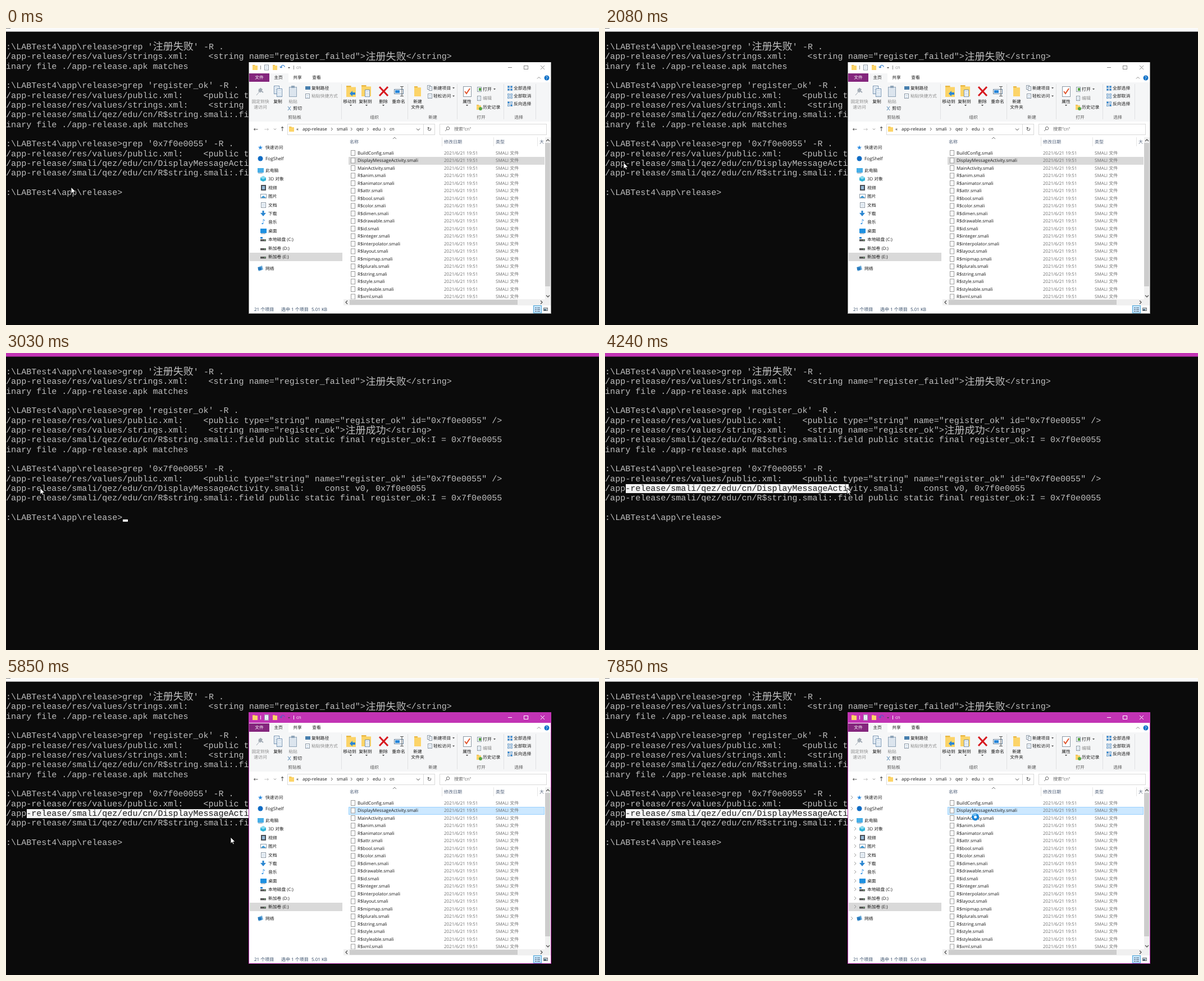
An HTML page with a canvas that plays this animation: 1056 px wide and 530 px high, repeating every 8 s.

```html
<!DOCTYPE html>
<html lang="zh">
<head>
<meta charset="utf-8">
<title>Console and file window</title>
<style>
html, body { margin: 0; width: 100%; height: 100%; overflow: hidden; background: #0b0b0b; }
canvas { display: block; }
</style>
</head>
<body>
<canvas id="stage" width="1056" height="530"></canvas>
<script>
const ctx = document.getElementById('stage').getContext('2d');
ctx.textRendering = 'geometricPrecision';

const LOOP = 8000, HIDE = 2200, BLUR = 5160, SHOW = 5850, SELECT = 3260, BUSY = 7270;
const UI = "'Open Sans', 'Noto Sans CJK SC', 'Noto Sans CJK', sans-serif";
const SYMBOL = "'DejaVu Sans', sans-serif";
const MAGENTA = '#c233b4', BLUE = '#2b86d1', FOLDER = '#fcd468', GRAY = '#8c8c8c';

// ---- drawing helpers ----
function box(x, y, w, h, fill, edge) {
  if (fill) { ctx.fillStyle = fill; ctx.fillRect(x, y, w, h); }
  if (edge) { ctx.strokeStyle = edge; ctx.lineWidth = 1; ctx.strokeRect(x + .5, y + .5, w - 1, h - 1); }
}
function line(color, width, ...p) {
  ctx.beginPath();
  for (let i = 0; i < p.length; i += 2) ctx.lineTo(p[i], p[i + 1]);
  ctx.strokeStyle = color;
  ctx.lineWidth = width;
  ctx.stroke();
}
function shape(fill, ...p) {
  ctx.beginPath();
  for (let i = 0; i < p.length; i += 2) ctx.lineTo(p[i], p[i + 1]);
  ctx.closePath();
  ctx.fillStyle = fill;
  ctx.fill();
}
function disc(x, y, r, fill) {
  ctx.beginPath();
  ctx.arc(x, y, r, 0, 7);
  ctx.fillStyle = fill;
  ctx.fill();
}
// y is the middle of the line
function text(s, x, y, color = '#1a1a1a', size = 8, align = 'left', family = UI) {
  ctx.font = `${size}px ${family}`;
  ctx.textAlign = align;
  ctx.fillStyle = color;
  ctx.fillText(s, x, y + size * .36);
}
const symbol = (s, x, y, color, size) => text(s, x, y, color, size, 'center', SYMBOL);
const label = (s, x, y, color) => text(s, x, y, color, 7.8, 'center');
const caret = (x, y) => shape('#444', x - 2, y - 1, x + 2, y - 1, x, y + 1.2);
function page(x, y, w, h, edge = '#8a98a6') {
  box(x, y, w, h, '#fff', edge);
  for (let i = 3; i < h - 2; i += 3) box(x + 2, y + i, w - 4, 1, '#a9c4de');
}
function folder(x, y, w, h) {
  box(x, y, w * .5, h, '#e9b63f');
  box(x, y + h * .12, w, h * .88, FOLDER);
}

// ---- console ----
const CELL = 9.02, LEFT = -8.9, ROW = 17.36, TOP = 24.6, PICKED = 12, START = 5;
const prompt = 'E:\\LABTest4\\app\\release>', base = './app-release/';
const pub = base + 'res/values/public.xml:    <public type="string" name="register_ok" id="0x7f0e0055" />';
const field = base + 'smali/qez/edu/cn/R$string.smali:.field public static final register_ok:I = 0x7f0e0055';
const match = 'Binary file ./app-release.apk matches';
const rows = [
  prompt + "grep '注册失败' -R .",
  base + 'res/values/strings.xml:    <string name="register_failed">注册失败</string>',
  match, '',
  prompt + "grep 'register_ok' -R .",
  pub,
  base + 'res/values/strings.xml:    <string name="register_ok">注册成功</string>',
  field, match, '',
  prompt + "grep '0x7f0e0055' -R .",
  pub,
  base + 'smali/qez/edu/cn/DisplayMessageActivity.smali:    const v0, 0x7f0e0055',
  field, '',
  prompt
];
const colX = col => LEFT + col * CELL;

function printRow(i, color) {
  let x = LEFT;
  ctx.fillStyle = color;
  ctx.textAlign = 'left';
  for (const run of rows[i].match(/[\u4e00-\u9fff]+|[^\u4e00-\u9fff]+/g) || []) {
    const wide = run > '\u4e00';
    ctx.font = wide ? "300 18.04px 'Noto Sans CJK SC', 'Noto Sans CJK', sans-serif"
                    : "15.03px 'Liberation Mono', monospace";
    ctx.fillText(run, x, TOP + i * ROW + (wide ? 14.8 : 13.2));
    x += run.length * CELL * (wide ? 2 : 1);
  }
}

function drawConsole(t, mouse) {
  const focused = t >= HIDE && t < BLUR;
  box(0, 0, 1056, 530, '#0b0b0b');
  box(0, 0, 1056, 6.5, focused ? MAGENTA : '#fbfbfb');
  if (!focused) box(0, 0, 8, 1, '#777');
  rows.forEach((_, i) => printRow(i, '#bebebe'));
  if (t >= SELECT) {
    const end = t < 4600 ? Math.floor((mouse.x - LEFT) / CELL) + 1 : 53;
    const x = Math.round(colX(START)) + 1, y = Math.round(TOP + PICKED * ROW) + 1;
    ctx.save();
    ctx.beginPath();
    ctx.rect(x, y, Math.round((end - START) * CELL), 16);
    ctx.clip();
    box(x, y, 500, 20, '#f2f2f2');
    printRow(PICKED, '#1c1c1c');
    ctx.restore();
  }
  if (focused && (t - 2510 + 1060) % 1060 < 530) box(208, 297, 9, 4, '#fff');
}

// ---- file window ----
const files = ['BuildConfig', 'DisplayMessageActivity', 'MainActivity',
  ...'anim animator attr bool color dimen drawable id integer interpolator layout mipmap plurals string style styleable xml'
    .split(' ').map(s => 'R$' + s)];

const screen = (x, y, c) => { box(x - 5, y - 4, 11, 8, c); box(x - 4, y + 4.5, 8, 1, '#6d8aa5'); };
const disk = (x, y) => { box(x - 5, y, 10, 3.5, '#555'); box(x + 2, y + 1, 2, 1, '#7fe08a'); };
const nav = [
  ['快速访问', 213, (x, y) => symbol('★', x, y, '#2c8be0', 11)],
  ['FogShelf', 233, (x, y) => disc(x, y, 4.5, '#0f6cc4')],
  ['此电脑', 254, (x, y) => screen(x, y, '#45aee8')],
  ['3D 对象', 269, (x, y) => { shape('#2fb4d8', x - 5, y - 2, x, y - 5, x + 5, y - 2, x + 5, y + 3, x, y + 5, x - 5, y + 3); shape('#8adcf0', x - 5, y - 2, x, y - 5, x + 5, y - 2, x, y + 1); }],
  ['视频', 285, (x, y) => { box(x - 4, y - 5, 9, 10, '#4a4f57'); box(x - 2, y - 3, 5, 6, '#93b7d4'); }],
  ['图片', 300, (x, y) => { box(x - 5, y - 4, 11, 8, '#fff', '#8b9aa8'); shape('#3d9bd8', x - 4, y + 3, x, y - 1, x + 5, y + 3); }],
  ['文档', 316, (x, y) => page(x - 4, y - 5, 9, 10)],
  ['下载', 331, (x, y) => { box(x - 1.5, y - 5, 3, 5, BLUE); shape(BLUE, x - 5, y - 1, x + 5, y - 1, x, y + 5); }],
  ['音乐', 346, (x, y) => symbol('♪', x, y, '#1e88e5', 12)],
  ['桌面', 362, (x, y) => screen(x, y, '#1e90e0')],
  ['本地磁盘 (C:)', 377, (x, y) => { disk(x, y); box(x - 5, y - 4, 4, 3, BLUE); }],
  ['新加卷 (D:)', 393, disk],
  ['新加卷 (E:)', 408, disk],
  ['网络', 429, (x, y) => { shape('#6aa9d8', x - 5, y - 2, x + 3, y - 5, x + 5, y + 2, x - 3, y + 5); box(x - 4, y - 2, 6, 5, '#2779bd'); }]
];

function drawTitle(active) {
  const ink = active ? '#fff' : '#8a8a8a';
  box(433, 61, 537, 19, active ? MAGENTA : '#fff');
  folder(439, 66, 9, 9);
  box(453, 67, 1, 7, ink);
  page(460, 65.5, 8, 10);
  folder(475, 66, 8, 9);
  symbol('↶', 492, 70, active ? '#4a63c0' : '#1f6fc4', 12);
  caret(504, 71);
  box(512, 67, 1, 7, ink);
  text('cn', 517, 70.5, ink);
  line(ink, 1, 894, 70.5, 901, 70.5);
  box(922, 67, 8, 7, null, ink);
  line(ink, 1, 952, 67, 959, 74);
  line(ink, 1, 959, 67, 952, 74);
}

function drawRibbon() {
  box(433, 80, 537, 17, '#fff');
  box(433, 97, 537, 70, '#f5f6f7');
  box(433, 81, 36, 15, '#84267d');
  box(470, 81, 33, 17, '#f5f6f7');
  label('文件', 451, 88.5, '#fff');
  label('主页', 485, 88.5);
  label('共享', 519, 88.5);
  label('查看', 553, 88.5);
  line('#888', 1, 946, 90.5, 949, 87.5, 952, 90.5);
  disc(963, 89, 4.5, '#1473c8');
  label('?', 963, 89, '#fff');
  for (const x of [597, 715, 803, 886, 943]) box(x, 100, 1, 63, '#e0e1e3');
  [['剪贴板', 514], ['组织', 656], ['新建', 760], ['打开', 846], ['选择', 913]]
    .forEach(([s, x]) => label(s, x, 159.5, '#555'));

  line('#a2abb5', 5, 455, 108, 451, 114);
  line('#a2abb5', 2, 450, 109, 458, 115);
  line('#a2abb5', 1, 451, 114, 446, 120);
  label('固定到快', 453, 131, GRAY);
  label('速访问', 453, 141, GRAY);
  page(477, 103, 10, 15, '#6f8fb0');
  page(482, 108, 10, 15, '#6f8fb0');
  label('复制', 484, 131);
  box(504, 105, 14, 18, '#dce5ee', '#8fa4b8');
  box(508, 103, 6, 4, '#8fa4b8');
  label('粘贴', 511, 131, GRAY);
  line('#477fae', 1, 502, 140, 507, 147);
  line('#477fae', 1, 507, 140, 502, 147);
  text('剪切', 511, 143.5);
  box(533, 104, 9, 6, '#477fae');
  text('复制路径', 544, 107, '#1a1a1a', 7.8);
  page(533, 117, 8, 9);
  text('粘贴快捷方式', 544, 121.5, GRAY, 7.8);

  folder(606, 103, 17, 20);
  shape('#2886d8', 612, 117, 617, 112, 617, 115, 622, 115, 622, 119, 617, 119, 617, 122);
  label('移动到', 612, 131);
  caret(614, 138);
  folder(633, 102, 17, 20);
  page(639, 110, 9, 13, '#6f8fb0');
  label('复制到', 640, 131);
  caret(642, 138);
  line('#d7191f', 3, 665, 105, 680, 121);
  line('#d7191f', 3, 680, 105, 665, 121);
  label('删除', 672, 131);
  caret(672, 138);
  box(691, 109, 17, 9, '#fff', '#64829e');
  box(693, 111, 8, 5, '#2886d8');
  line('#555', 1, 702, 104.5, 708, 104.5, 705, 104.5, 705, 121.5, 702, 121.5, 708, 121.5);
  label('重命名', 699, 131);

  folder(727, 104, 12, 18);
  label('新建', 733, 131);
  label('文件夹', 733, 141);
  page(750, 102, 6, 8);
  page(753, 104, 6, 8);
  text('新建项目', 761, 107, '#1a1a1a', 7.8);
  caret(797, 107);
  page(751, 117, 8, 9);
  text('轻松访问', 761, 121.5, '#1a1a1a', 7.8);
  caret(797, 121.5);

  box(814, 104, 15, 19, '#fff', '#8b98a4');
  line('#e0542c', 2, 817, 113, 820, 117, 826, 108);
  label('属性', 821, 131);
  caret(821, 138);
  page(839, 105, 8, 9);
  box(842, 107, 4, 5, '#59a548');
  text('打开', 849, 109);
  caret(870, 109);
  page(839, 121, 7, 9);
  text('编辑', 849, 125.5, GRAY);
  folder(838, 137, 8, 9);
  disc(845, 144, 3, '#59a548');
  text('历史记录', 849, 141.5, '#1a1a1a', 7.8);

  ['全部选择', '全部取消', '反向选择'].forEach((s, i) => {
    const y = 103 + 14 * i;
    for (let k = 0; k < 4; k++) {
      const on = i === 0 || i === 2 && k % 3 === 0;
      box(893 + k % 2 * 5, y + (k >> 1) * 5, 4, 4, on ? '#2886d8' : '#d5e4f2', '#7da7cd');
    }
    text(s, 904, y + 4.5, '#1a1a1a', 7.8);
  });
}

function drawAddress() {
  symbol('←', 445, 180.5, '#444', 10);
  symbol('→', 464, 180.5, '#bbb', 10);
  line('#888', 1, 477, 179.5, 479, 181.5, 481, 179.5);
  symbol('↑', 492, 180.5, '#444', 11);
  box(501, 171, 263, 20, '#fff', '#d9d9d9');
  box(743, 171, 1, 20, '#d9d9d9');
  folder(504, 176, 9, 9);
  text('«', 517, 180);
  [['app-release', 528], ['smali', 589], ['qez', 624], ['edu', 653], ['cn', 683]].forEach(([s, x], i) => {
    text(s, x, 180.5);
    if (i) line('#555', 1, x - 10, 178, x - 7.5, 180.5, x - 10, 183);
  });
  line('#444', 1, 731, 179.5, 734, 182.5, 737, 179.5);
  symbol('↻', 754, 180.5, '#444', 10);
  box(772, 171, 191, 20, '#fff', '#d9d9d9');
  ctx.beginPath();
  ctx.arc(787, 179, 2.7, 0, 7);
  ctx.strokeStyle = '#777';
  ctx.stroke();
  line('#777', 1, 785, 181, 782, 184);
  text('搜索"cn"', 798, 180.5, '#666');
}

function drawNav(active, mouse) {
  const inside = active && mouse.x > 432;
  nav.forEach(([name, y, icon], i) => {
    const child = i > 2 && i < 13, x = child ? 467 : 462;
    if (i === 12) box(434, 401, 165, 15, '#d9d9d9');
    else if (inside && mouse.x < 599 && Math.abs(y - mouse.y) < 7.7) box(434, y - 7, 165, 15, '#e5f3ff');
    icon(x - 9, y);
    text(name, x, y, '#1a1a1a', i === 1 ? 8.2 : 7.8);
    if (!inside) return;
    const cx = child ? 445 : 439;
    if (i === 2) line('#444', 1, cx - 3, y - 1.5, cx, y + 1.5, cx + 3, y - 1.5);
    else line('#9a9a9a', 1, cx - 1, y - 3, cx + 2, y, cx - 1, y + 3);
  });
}

function drawFiles(active) {
  for (const x of [776, 868, 946]) box(x, 195, 1, 16, '#e5e5e5');
  line('#777', 1, 689, 198, 692, 195, 695, 198);
  [['名称', 612], ['修改日期', 780], ['类型', 872], ['大', 950]].forEach(([s, x]) => text(s, x, 203.5, '#50607a'));
  files.forEach((name, i) => {
    const y = 223 + i * 13.5;
    if (i === 1) box(610, 230, 349, 14, active ? '#cce8ff' : '#d9d9d9', active ? '#99d1ff' : null);
    box(614, y - 5, 8, 10, '#fff', '#9a9a9a');
    text(name + '.smali', 626, y);
    text('2021/6/21 19:51', 780, y, '#6d6d6d');
    text('SMALI 文件', 872, y, '#6d6d6d');
  });
  box(960, 195, 10, 290, '#f0f0f0');
  box(960, 205, 9, 256, '#cdcdcd');
  line('#555', 1.3, 962, 202, 965, 199, 968, 202);
  line('#555', 1.3, 962, 477, 965, 480, 968, 477);
  box(601, 484, 369, 11, '#f0f0f0');
  box(612, 485, 299, 9, '#cdcdcd');
  line('#555', 1.3, 608, 486.5, 605, 489.5, 608, 492.5);
  line('#555', 1.3, 952, 486.5, 955, 489.5, 952, 492.5);
}

function drawStatus() {
  box(433, 495, 537, 14, '#fff');
  text('21 个项目', 442, 502.5, '#28415f');
  text('选中 1 个项目', 490, 502.5, '#28415f');
  text('5.01 KB', 544, 502.5, '#28415f');
  box(939, 495, 15, 14, '#cce8ff', '#4aa5d8');
  for (let i = 0; i < 3; i++) {
    box(942, 499 + i * 3, 3, 1, '#3d5a70');
    box(946, 499 + i * 3, 5, 1, '#3d5a70');
  }
  box(957, 499, 8, 6, '#b9cbd6', '#777');
  box(958, 502, 4, 2, '#3d5a70');
}

function drawWindow(active, mouse) {
  box(432, 61, 539, 449, active ? MAGENTA : '#8a8a8a');
  box(433, 61, 537, 448, '#fff');
  drawTitle(active);
  drawRibbon();
  drawAddress();
  drawNav(active, mouse);
  drawFiles(active);
  drawStatus();
}

// ---- pointer ----
const path = [
  [0, 116, 284], [210, 116, 284], [840, 52, 253], [1000, 62, 273], [1080, 55, 258], [1540, 55, 258],
  [2080, 33, 240], [2370, 34, 241], [3030, 61, 241], [3220, 40, 242], [3990, 369, 242], [4240, 431, 241],
  [4500, 466, 239], [4820, 466, 239], [4940, 400, 284], [5900, 400, 284], [6480, 597, 238],
  [6650, 597, 238], [7100, 651, 239], [LOOP, 651, 239]
];
function pointerAt(t) {
  const i = path.findIndex(p => p[0] > t), [t0, x0, y0] = path[i - 1], [t1, x1, y1] = path[i];
  const k = (t - t0) / (t1 - t0);
  return { x: x0 + (x1 - x0) * k, y: y0 + (y1 - y0) * k };
}
function drawPointer(t, { x, y }) {
  if (t >= BUSY) {
    disc(659.5, 248, 6.5, '#1583d8');
    disc(659.5, 248, 2.6, '#e8f5ff');
    const a = (t - BUSY) / 1000 * 2 * Math.PI;
    ctx.beginPath();
    ctx.arc(659.5, 248, 4.6, a, a + 1.5);
    ctx.strokeStyle = '#7cc8f5';
    ctx.lineWidth = 2.4;
    ctx.stroke();
    return;
  }
  const p = [0, 0, 0, 11.5, 2.7, 9, 4.4, 13, 6.3, 12.2, 4.6, 8.4, 8, 8.2, 0, 0].map((v, i) => v + (i % 2 ? y : x));
  shape('#fff', ...p);
  line('#000', .9, ...p);
}

function frame(now) {
  const t = now % LOOP, mouse = pointerAt(t);
  drawConsole(t, mouse);
  if (t < HIDE || t >= SHOW) drawWindow(t >= SHOW, mouse);
  drawPointer(t, mouse);
  requestAnimationFrame(frame);
}
requestAnimationFrame(frame);
</script>
</body>
</html>
```
